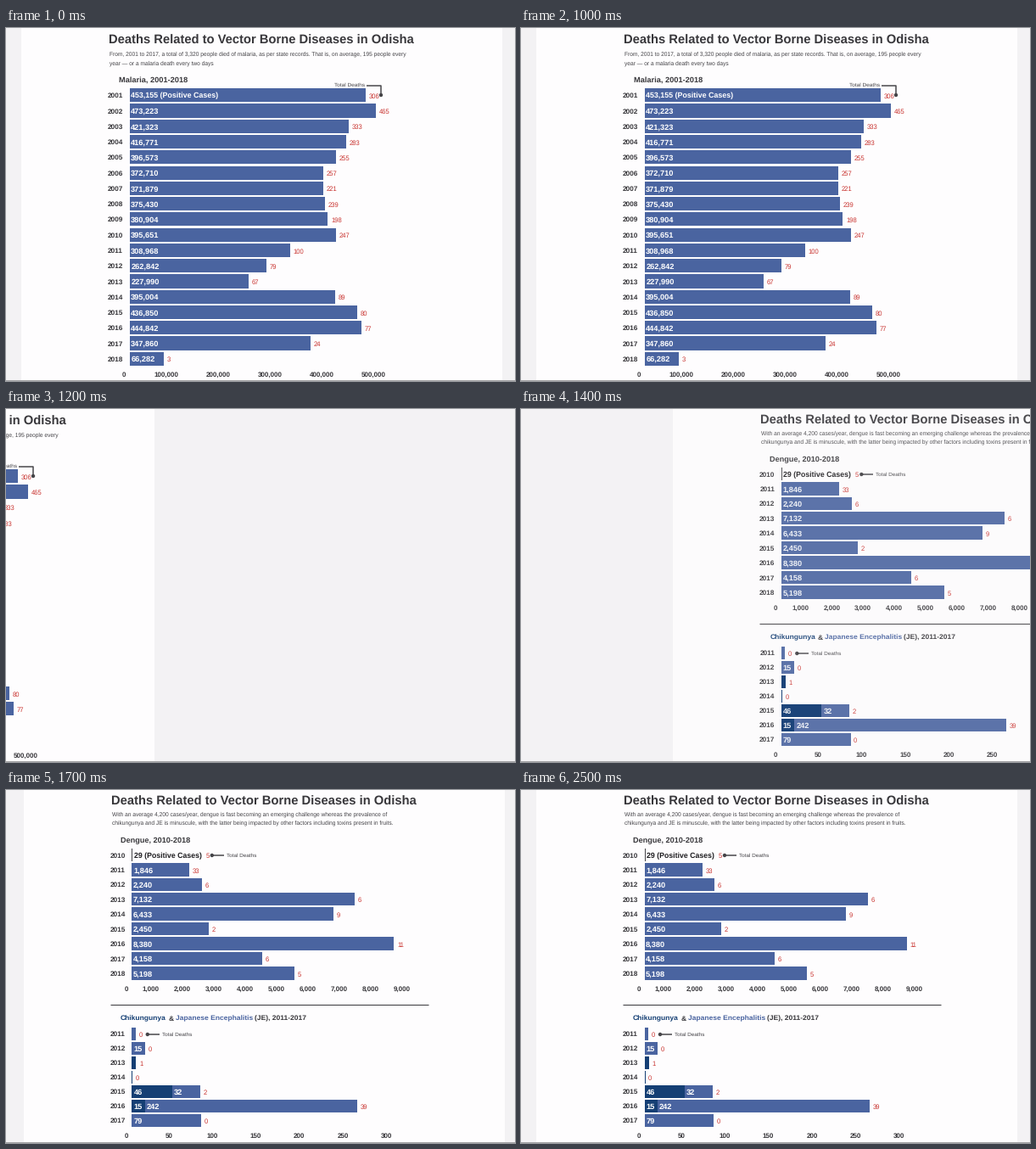
Animation, 600 px wide and 416 px high, one loop 2.7 s. Source, as a matplotlib script:

```python
import matplotlib.pyplot as plt
from matplotlib.animation import FuncAnimation
from matplotlib.patches import Circle, Rectangle
from matplotlib.transforms import Affine2D

W, H, DPI = 600, 416, 100
FRAMES, STEP = 27, 100  # count, ms
LEFT = 145.6            # common foot of all bars

GREY, PAPER = "#f3f2f4", "#fefdfe"
INK, NOTE = "#38373b", "#454448"
BLUE, NAVY, RED = "#4a64a0", "#153f74", "#c9332f"

plt.rcParams["font.family"] = "Liberation Sans"
plt.rcParams["text.hinting"] = "none"

fig = plt.figure(figsize=(W / DPI, H / DPI), dpi=DPI, facecolor=GREY)
ax = fig.add_axes([0, 0, 1, 1])
ax.set_xlim(0, W)
ax.set_ylim(H, 0)
ax.axis("off")


class Page:
    """A sheet whose parts move and fade together."""

    def __init__(self, title_y):
        self.shift = Affine2D()
        self.tr = self.shift + ax.transData
        self.parts = []
        self.rect(18, -2, 567, H + 4, PAPER)
        self.text(121, title_y,
                  "Deaths Related to Vector Borne Diseases in Odisha", 14.8)

    def rect(self, x, y, w, h, color):
        patch = Rectangle((x, y), w, h, fc=color, lw=0, transform=self.tr)
        self.parts.append(ax.add_patch(patch))

    def line(self, xs, ys, width=1.5):
        self.parts += ax.plot(xs, ys, color=NOTE, lw=width * 72 / DPI,
                              solid_capstyle="butt", transform=self.tr)

    def dot(self, x, y):
        patch = Circle((x, y), 2.2, fc=NOTE, lw=0, transform=self.tr)
        self.parts.append(ax.add_patch(patch))

    def text(self, x, mid, s, size, color=INK, weight="bold", ha="left"):
        """Place text with its capitals centred on height mid."""
        self.parts.append(ax.text(
            x, mid + 0.36 * size, s, size=size * 72 / DPI, color=color,
            weight=weight, ha=ha, va="baseline", transform=self.tr))

    def note(self, x, mid, s, size=6.6, color=NOTE):
        self.text(x, mid, s, size, color, "normal")

    def key(self, x, y):
        self.dot(x, y)
        self.line([x, x + 14], [y, y])
        self.note(x + 17, y, "Total Deaths", 6.4)

    def axis(self, y, first, gap, step, count):
        """Zero stands apart at the left, the other ticks are evenly spaced."""
        self.text(139, y, "0", 8, ha="center")
        for i in range(count):
            self.text(first + gap * i, y, f"{step * (i + 1):,}", 8, ha="center")

    def bars(self, top, pitch, scale, year, rows, deaths, caption=""):
        """Rows of one or two stacked bars, each ending in its death count."""
        height = pitch * 0.887
        for i, (row, died) in enumerate(zip(rows, deaths)):
            y, x = top + pitch * i, LEFT
            self.text(138, y, str(year + i), 8.3, ha="right")
            for n, color in zip(row, (BLUE, NAVY)):
                self.rect(x, y - height / 2, n * scale, height, color)
                x += n * scale
            self.note(x + 3.6, y + 0.8, str(died), 7.7, RED)
            if caption and i == 0:
                self.text(LEFT + 1.6, y, f"{row[0]:,} {caption}", 8.9, "white")
            elif len(row) == 1:
                self.text(LEFT + 1.6, y, f"{row[0]:,}", 9.3, "white")

    def place(self, dx, alpha=1):
        self.shift.clear().translate(dx, 0)
        for part in self.parts:
            part.set_alpha(alpha)


def malaria_page():
    page = Page(13.6)
    page.note(122, 30.5, "From, 2001 to 2017, a total of 3,320 people died of "
              "malaria, as per state records. That is, on average, 195 people "
              "every")
    page.note(122, 41, "year \u2014 or a malaria death every two days")
    page.text(133, 60.3, "Malaria, 2001-2018", 9.3)

    cases = [453155, 473223, 421323, 416771, 396573, 372710, 371879, 375430,
             380904, 395651, 308968, 262842, 227990, 395004, 436850, 444842,
             347860, 66282]
    deaths = [306, 465, 333, 283, 255, 257, 221, 239, 198, 247, 100, 79, 67,
              89, 80, 77, 24, 3]
    page.bars(79.3, 18.26, 6.14e-4, 2001, [(n,) for n in cases], deaths,
              "(Positive Cases)")
    page.note(387, 66.8, "Total Deaths", 6.5)
    page.line([425, 442, 442], [67.5, 67.5, 79])
    page.dot(442, 79)
    page.axis(408, 188.5, 61.3, 100000, 5)
    return page


def add_dengue(page):
    page.text(132, 58.5, "Dengue, 2010-2018", 9.1)

    # The first bar is a sliver, so its caption stands beside it.
    page.text(138, 76.5, "2010", 8.3, ha="right")
    page.rect(LEFT, 69, 1, 15.4, NOTE)
    page.text(148, 76.5, "29 (Positive Cases)", 8.8, "#1c1b1e")
    page.note(232.5, 77.3, "5", 7.7, RED)
    page.key(240, 77)

    cases = [1846, 2240, 7132, 6433, 2450, 8380, 4158, 5198]
    page.bars(93.9, 17.43, 0.03688, 2011, [(n,) for n in cases],
              [33, 6, 6, 9, 2, 11, 6, 5])
    page.axis(234, 168, 36.94, 1000, 9)


def add_stacked(page):
    for x, s, color in [(132, "Chikungunya", NAVY), (188.5, "&", INK),
                        (197, "Japanese Encephalitis", BLUE),
                        (290, "(JE), 2011-2017", INK)]:
        page.text(x, 268.5, s, 8.5, color)

    navy = [0, 0, 4.8, 0.9, 46, 15, 0]
    blue = [4.4, 15, 0, 0, 32, 242, 79]
    top, pitch, scale = 287.2, 17.03, 1.033
    # Totals go down first; the navy share then covers the left end.
    page.bars(top, pitch, scale, 2011,
              [(a + b, 0) for a, b in zip(navy, blue)], [0, 0, 1, 0, 2, 39, 0])
    for i, (a, b) in enumerate(zip(navy, blue)):
        y, height = top + pitch * i, pitch * 0.887
        page.rect(LEFT, y - height / 2, a * scale, height, NAVY)
        for start, n in ((0, a), (a, b)):
            if n >= 15:
                page.text(LEFT + start * scale + 2, y, str(n), 9.3, "white")
    page.key(164, 288)
    page.axis(407, 189, 51.3, 50, 6)


def second_page():
    page = Page(13)
    page.note(122, 28, "With an average 4,200 cases/year, dengue is fast "
              "becoming an emerging challenge whereas the prevalence of")
    page.note(122, 38.5, "chikungunya and JE is minuscule, with the latter "
              "being impacted by other factors including toxins present in "
              "fruits.")
    add_dengue(page)
    page.line([120, 495], [253, 253], 1.1)
    add_stacked(page)
    return page


first, second = malaria_page(), second_page()
ax.add_patch(Rectangle((0, 415), W, 1, fc="#a3a3a5", lw=0, zorder=9))


def update(i):
    t = i * STEP
    if t < 1300:
        first.place(-410 * (max(t - 1000, 0) / 200) ** 2.5)
        second.place(2 * W)
    else:
        rest = 161.3 * (max(1774 - t, 0) / 374) ** 2.5
        first.place(-2 * W)
        second.place(rest, 1 - rest / 1600)
    return first.parts + second.parts


anim = FuncAnimation(fig, update, frames=FRAMES, interval=STEP, repeat=True,
                     repeat_delay=0, init_func=lambda: update(0), blit=False)
plt.show()
```
